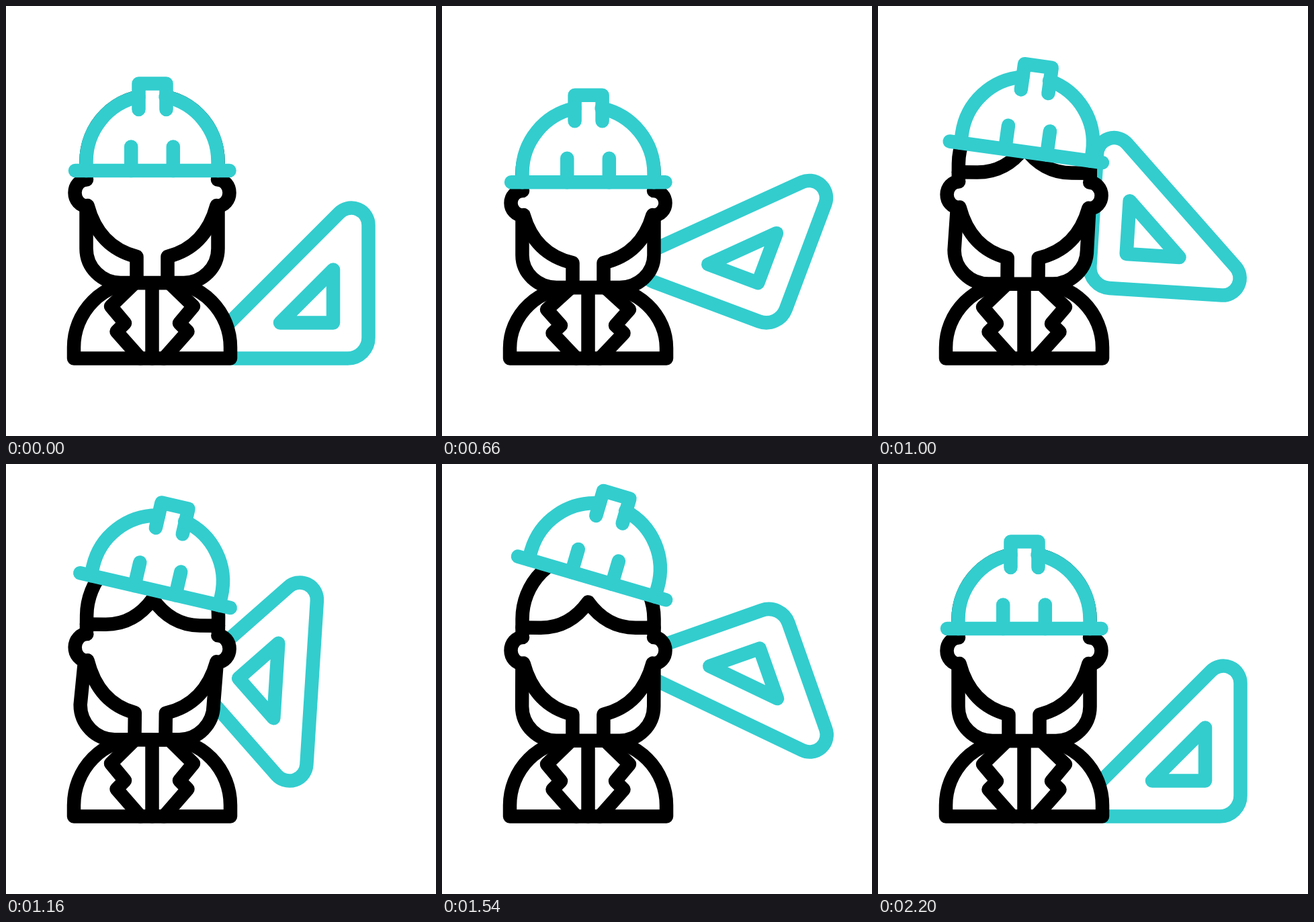
An HTML page with a canvas for the animation above (2400 ms loop, 640 by 640 pixels).

```html
<!DOCTYPE html>
<html lang="en">
<head>
<meta charset="utf-8">
<title>Engineer</title>
<style>
html, body { margin: 0; width: 100%; height: 100%; overflow: hidden; background: #fff; }
canvas { display: block; width: 100%; height: 100%; }
</style>
</head>
<body>
<canvas id="stage" width="640" height="640"></canvas>
<script>
const ctx = document.getElementById('stage').getContext('2d');
const LOOP = 2400, MID = 217.5, BASE = 524.5;
const TEAL = '#33cdce', INK = '#000';
const PI = Math.PI, RAD = PI / 180;

// Eases in and out between [time, value] keys.
function track(...keys) {
  return t => {
    let [t0, v0] = keys[0];
    for (const [t1, v1] of keys) {
      if (t < t1) {
        const s = Math.max(0, (t - t0) / (t1 - t0));
        return v0 + (v1 - v0) * s * s * (3 - 2 * s);
      }
      [t0, v0] = [t1, v1];
    }
    return v0;
  };
}

// Crouch, jump, land, settle.
const stretch = track([200, 1], [640, .938], [1365, 1.035], [1830, .932], [2200, 1]);
const sway = track([640, 0], [1260, -9.5], [1580, 0]);
const hatDip = track([200, 0], [640, 17.5], [1830, 19], [2200, 0]);
const hatToss = track([640, 0], [1390, 1], [1511, 1], [1820, 0]);
const rulerX = track([400, 427.7], [770, 437.4], [1150, 429.5], [1640, 437.8], [2200, 427.7]);
const rulerY = track([400, 412.6], [785, 311.5], [910, 311.5], [1570, 350.3], [2200, 412.6]);
const rulerTurn = track([400, 0], [2200, 360]);

// Traces a shape under the current transform, then paints it with an even pen.
function paint(trace, color, fill) {
  ctx.beginPath();
  trace();
  ctx.save();
  ctx.setTransform(1, 0, 0, 1, 0, 0);
  if (fill) {
    ctx.fillStyle = '#fff';
    ctx.fill();
  }
  if (color) {
    ctx.strokeStyle = color;
    ctx.stroke();
  }
  ctx.restore();
}

function line(...xy) {
  ctx.moveTo(xy[0], xy[1]);
  for (let i = 2; i < xy.length; i += 2) ctx.lineTo(xy[i], xy[i + 1]);
}

function mirrored(draw) {
  draw();
  ctx.save();
  ctx.translate(2 * MID, 0);
  ctx.scale(-1, 1);
  draw();
  ctx.restore();
}

function ruler(t) {
  ctx.save();
  ctx.translate(rulerX(t), rulerY(t));
  ctx.rotate(rulerTurn(t) * RAD);
  ctx.translate(-427.7, -412.6);
  paint(() => {
    ctx.moveTo(409.5, 394.5);
    ctx.arcTo(539.5, 264.5, 539.5, 524.5, 25.5);
    ctx.arcTo(539.5, 524.5, 279.5, 524.5, 31);
    ctx.arcTo(279.5, 524.5, 539.5, 264.5, 25.5);
    ctx.closePath();
  }, TEAL);
  paint(() => {
    line(487, 392.5, 487, 471.5, 408, 471.5);
    ctx.closePath();
  }, TEAL);
  ctx.restore();
}

function body() {
  paint(() => {
    ctx.moveTo(101, BASE);
    ctx.lineTo(101, 508);
    ctx.arc(198, 508, 97, PI, 1.5 * PI);
    ctx.arc(237, 508, 97, 1.5 * PI, 2 * PI);
    ctx.lineTo(334, BASE);
    ctx.closePath();
  }, INK, true);
  paint(() => line(MID, 412, MID, BASE), INK);
  mirrored(() => paint(() =>
    line(192, 412, 156, 447, 177, 472, 164.5, 484.5, 200, BASE), INK));
}

function backHair(shift) {
  const l = 119.5 + shift, r = 315.5 + shift * .75;
  paint(() => {
    ctx.moveTo(119.5 + shift * .25, 295);
    ctx.lineTo(l, 361);
    ctx.arc(l + 51, 361, 51, PI, PI / 2, true);
    ctx.lineTo(r - 51, 412);
    ctx.arc(r - 51, 361, 51, PI / 2, 0, true);
    ctx.lineTo(315.5 + shift * .15, 295);
  }, INK, true);
}

function head(shift) {
  const neck = shift * .2;
  paint(() => {
    ctx.moveTo(119.5, 258.5);
    ctx.lineTo(119.5, 231);
    ctx.arc(MID, 231, 98, PI, 2 * PI);
    ctx.lineTo(315.5, 258.5);
    ctx.ellipse(315, 278, 17.5, 19.5, 0, -PI / 2, PI / 2);
    ctx.lineTo(313.5, 297);
    ctx.quadraticCurveTo(297, 359, 240.5 + neck, 373);
    ctx.lineTo(240.5 + neck, 412);
    ctx.lineTo(194.5 + neck, 412);
    ctx.lineTo(194.5 + neck, 373);
    ctx.quadraticCurveTo(138, 359, 121.5, 297);
    ctx.ellipse(120, 278, 17.5, 19.5, 0, PI / 2, 1.5 * PI);
    ctx.closePath();
  }, INK, true);
  paint(() => {
    ctx.moveTo(119.5, 244.2);
    ctx.lineTo(147, 244.2);
    ctx.quadraticCurveTo(190, 244.2, MID, 206);
    ctx.quadraticCurveTo(245, 244.2, 288, 244.2);
    ctx.lineTo(315.5, 244.2);
  }, INK);
}

function helmet(t) {
  const toss = hatToss(t), gap = Math.acos(20 / 98);
  ctx.save();
  ctx.translate(MID + 5.5 * toss, 245 + hatDip(t) - 96.5 * toss);
  ctx.rotate(16.8 * toss * RAD);
  ctx.translate(-MID, -245);
  paint(() => {
    ctx.moveTo(119.5, 245);
    ctx.lineTo(119.5, 231);
    ctx.arc(MID, 231, 98, PI, 2 * PI);
    ctx.lineTo(315.5, 245);
  }, null, true);
  paint(() => line(197.5, 154, 197.5, 115.5, 238.5, 115.5, 238.5, 154), TEAL, true);
  mirrored(() => {
    paint(() => {
      ctx.moveTo(119.5, 245);
      ctx.lineTo(119.5, 231);
      ctx.arc(MID, 231, 98, PI, PI + gap);
    }, TEAL);
    paint(() => line(186.2, 209.5, 186.2, 245), TEAL);
  });
  paint(() => line(103, 245, 332.5, 245), TEAL);
  ctx.restore();
}

function draw(t) {
  const shift = sway(t);
  ctx.setTransform(1, 0, 0, 1, 0, 0);
  ctx.fillStyle = '#fff';
  ctx.fillRect(0, 0, 640, 640);
  ctx.lineWidth = 20.5;
  ctx.lineCap = ctx.lineJoin = 'round';

  ruler(t);

  // The figure stretches from its base while the line weight stays even.
  ctx.save();
  ctx.translate(0, BASE);
  ctx.scale(1, stretch(t));
  ctx.translate(0, -BASE);
  body();
  backHair(shift);
  ctx.translate(MID, 290);
  ctx.rotate(-shift * .07 * RAD);
  ctx.translate(-MID, -290);
  head(shift);
  ctx.restore();

  helmet(t);
}

const start = performance.now();
function tick(now) {
  draw(Math.max(0, now - start) % LOOP);
  requestAnimationFrame(tick);
}
draw(0);
requestAnimationFrame(tick);
</script>
</body>
</html>
```
